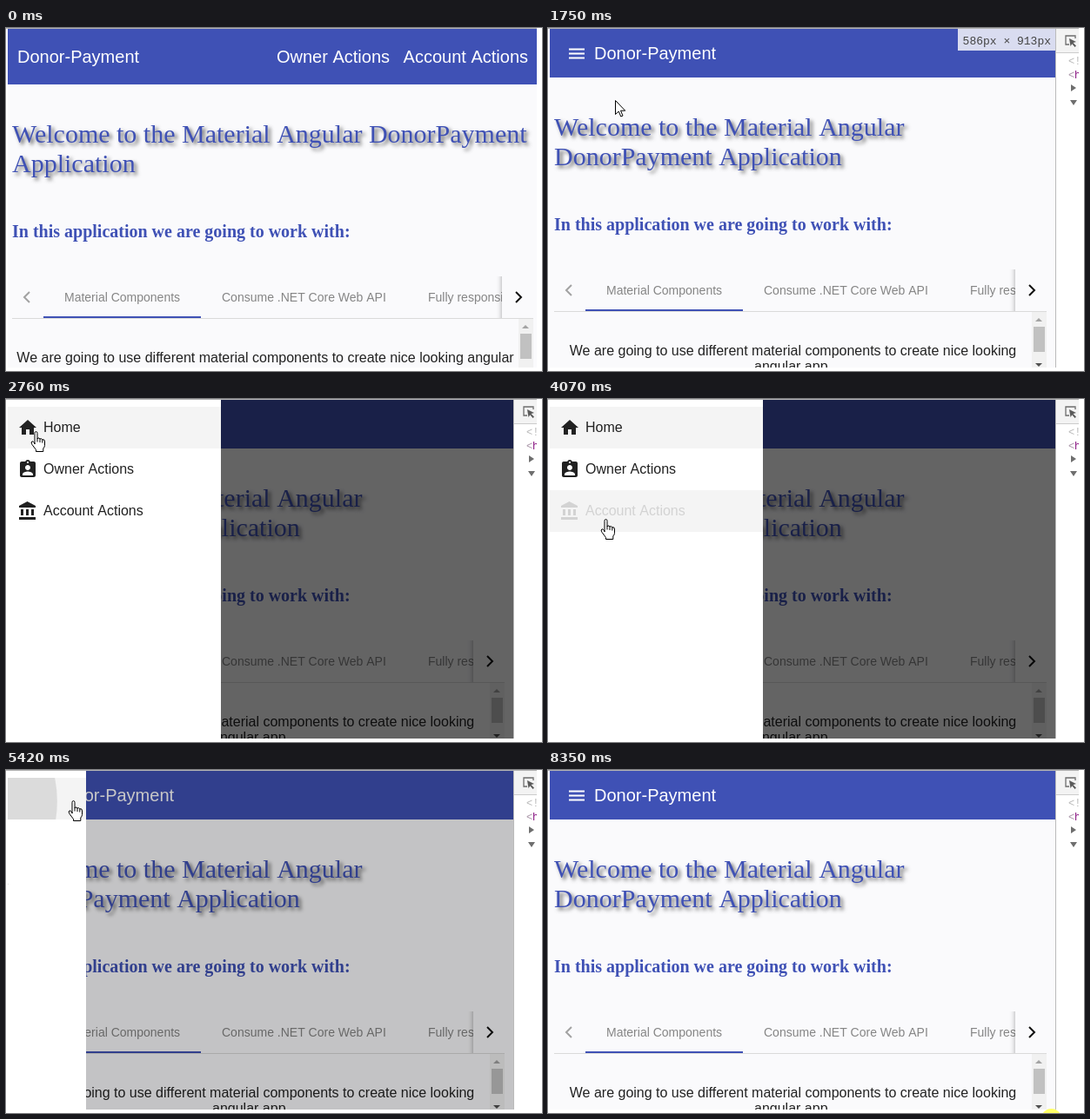
Recreate the animation shown at these times as an HTML page with a canvas. Size 616x395 px, loop 8480 ms.

```html
<!DOCTYPE html>
<html lang="en">
<head>
<meta charset="utf-8">
<title>Responsive navigation</title>
<style>
html, body { margin: 0; width: 100%; height: 100%; overflow: hidden; background: #fff; }
canvas { display: block; width: 616px; height: 395px; }
</style>
</head>
<body>
<canvas id="stage" width="616" height="395"></canvas>
<script>
const ctx = document.getElementById('stage').getContext('2d');
const LOOP = 8480;
const SANS = '"Liberation Sans", Arial, sans-serif';
const SERIF = '"Liberation Serif", "Times New Roman", serif';
const MONO = '"Liberation Mono", monospace';
const BLUE = '#3f51b5', PAPER = '#fafafc', HOVER = '#d3d3d3';
const DRAWER = 245;

const TICKS = [0,
  380, 460, 550, 650, 740, 840, 940, 1040, 1140,
  1390, 1480, 1570, 1660, 1750, 1870, 1960, 2040, 2120,
  2250, 2310, 2380, 2440, 2500, 2630, 2760, 3080,
  3260, 3340, 3420, 3490, 3570, 3770, 3850, 3920, 4000, 4070,
  4270, 4340, 4420, 4670, 4740, 4820, 4890, 4970, 5040,
  5290, 5350, 5420, 5530, 5620, 5710, 5840, 5960, 6090,
  6150, 6230, 6310, 6390, 6470, 7100, 7160, 7210, 8350];

// Pointer tip: time, x, y.
const POINTER = [
  [1390, 566, 338], [1660, 140, 118], [1750, 77, 83], [1870, 60, 66], [2120, 34, 37],
  [2760, 34, 37], [3080, 36, 39], [3190, 36, 39], [3570, 55, 80], [3700, 55, 80],
  [4070, 66, 138], [4200, 66, 138], [4420, 68, 85], [4600, 68, 85], [5040, 77, 35],
  [5530, 77, 35], [6090, 79, 36], [6150, 84, 60], [6390, 150, 290],
  [7100, 376, 381], [7160, 398, 380]];

const ICONS = {
  menu: 'M3 18h18v-2H3zm0-5h18v-2H3zm0-7v2h18V6z',
  home: 'M10 20v-6h4v6h5v-8h3L12 3 2 12h3v8z',
  badge: 'M19 3h-4.18C14.4 1.84 13.3 1 12 1c-1.3 0-2.4.84-2.82 2H5c-1.1 0-2 .9-2 2v14c0 1.1.9 2 2 2h14c1.1 0 2-.9 2-2V5c0-1.1-.9-2-2-2zm-7 0c.55 0 1 .45 1 1s-.45 1-1 1-1-.45-1-1 .45-1 1-1zm0 4c1.66 0 3 1.34 3 3s-1.34 3-3 3-3-1.34-3-3 1.34-3 3-3zm6 12H6v-1.4c0-2 4-3.1 6-3.1s6 1.1 6 3.1z',
  bank: 'M4 10v7h3v-7zm6 0v7h3v-7zM2 22h19v-3H2zm14-12v7h3v-7zm-4.5-9L2 6v2h19V6z',
  arrow: 'M.5 .5V16.5L4.2 13 6.8 19 9 18 6.5 12.2H11.7Z',
  hand: 'M5 15V2.5Q5 .5 6.5 .5T8 2.5V8.5Q10.5 7 11 9Q13.2 8 13.8 9.8Q16.5 9 16.5 12V16.5Q16.5 18 14.8 20V23.5H6.5V21.5L2 15.5Q.2 12.5 2 11.8Q3.3 11.5 5 14Z',
  fingers: 'M8 8V12.5M11 9V13M13.8 9.8V13.5'
};
for (const name in ICONS) ICONS[name] = new Path2D(ICONS[name]);

const ITEMS = [['home', 'Home'], ['badge', 'Owner Actions'], ['bank', 'Account Actions']];

const clamp = v => Math.max(0, Math.min(1, v));
const span = (t, from, to) => clamp((t - from) / (to - from));

function bezier(x1, y1, x2, y2) {
  const at = (s, a, b) => 3 * (1 - s) * (1 - s) * s * a + 3 * (1 - s) * s * s * b + s * s * s;
  return x => {
    if (x >= 1) return 1;
    let lo = 0, hi = 1;
    for (let i = 0; i < 24; i++) {
      const mid = (lo + hi) / 2;
      if (at(mid, x1, x2) < x) lo = mid; else hi = mid;
    }
    return at(lo, y1, y2);
  };
}
const slide = bezier(.25, .8, .25, 1);
const spread = bezier(0, 0, .2, 1);

function rect(x, y, w, h, color) {
  ctx.fillStyle = color;
  ctx.fillRect(x, y, w, h);
}
function disc(x, y, r, color) {
  ctx.fillStyle = color;
  ctx.beginPath();
  ctx.arc(x, y, r, 0, 7);
  ctx.fill();
}
function text(str, x, y, font, color, align = 'left') {
  ctx.font = font;
  ctx.fillStyle = color;
  ctx.textAlign = align;
  ctx.fillText(str, x, y);
}
function width(str, font) {
  ctx.font = font;
  return ctx.measureText(str).width;
}
function poly(points, color, lineWidth) {
  ctx.beginPath();
  points.forEach(([x, y]) => ctx.lineTo(x, y));
  if (lineWidth) {
    ctx.strokeStyle = color;
    ctx.lineWidth = lineWidth;
    ctx.stroke();
  } else {
    ctx.fillStyle = color;
    ctx.fill();
  }
}
function icon(name, x, y, color) {
  ctx.save();
  ctx.translate(x, y);
  ctx.fillStyle = color;
  ctx.fill(ICONS[name]);
  ctx.restore();
}
function clipped(x, y, w, h, draw) {
  ctx.save();
  ctx.beginPath();
  ctx.rect(x, y, w, h);
  ctx.clip();
  draw();
  ctx.restore();
}
function chevron(x, y, dir, color) {
  poly([[x - 3 * dir, y - 6], [x + 3 * dir, y], [x - 3 * dir, y + 6]], color, 2);
}

function pointerAt(t) {
  if (t < 1390 || (t >= 6470 && t < 7100) || t >= 7210) return null;
  let i = POINTER.findIndex(k => k[0] > t);
  if (i < 0) i = POINTER.length;
  const a = POINTER[i - 1], b = POINTER[i] || a;
  const p = a === b ? 0 : span(t, a[0], b[0]);
  return { x: a[1] + (b[1] - a[1]) * p, y: a[2] + (b[2] - a[2]) * p,
    hand: t >= 2040 && t < 6150 };
}

function toolbar(t, edge, small) {
  const font = '20px ' + SANS;
  rect(2, 1, edge - 2, small ? 56 : 64, BLUE);
  if (!small) {
    text('Donor-Payment', 13, 40, font, '#fff');
    text('Account Actions', edge - 16, 40, font, '#fff', 'right');
    text('Owner Actions', edge - 175, 40, font, '#fff', 'right');
    return;
  }
  if (t >= 2250 && t < 2760) {
    disc(33, 29, 20 * spread(span(t, 2200, 2440)), 'rgba(0,0,0,.14)');
  } else if (t >= 5700 && t < 8350) {
    disc(33, 29, 20, `rgba(0,0,0,${.15 * span(t, 5650, 5840)})`);
  }
  icon('menu', 21, 17.5, '#fff');
  text('Donor-Payment', 53, 36, font, t >= 5710 && t < 6230 ? HOVER : '#fff');
}

function heading(edge, dy) {
  const font = '30px ' + SERIF;
  let first = 'Welcome to the Material Angular', second = 'Application';
  const full = first + ' DonorPayment';
  if (7 + width(full, font) > edge - 12) second = 'DonorPayment ' + second;
  else first = full;
  ctx.save();
  ctx.shadowColor = 'rgba(60,60,60,.8)';
  ctx.shadowOffsetX = 3;
  ctx.shadowOffsetY = 3;
  ctx.shadowBlur = 4;
  text(first, 7, 132 + dy, font, BLUE);
  text(second, 7, 166 + dy, font, BLUE);
  ctx.restore();
  text('In this application we are going to work with:', 7, 241 + dy, 'bold 20px ' + SERIF, BLUE);
}

function tabs(edge, dy) {
  const font = '14px ' + SANS, right = edge - 10, y = 310 + dy;
  rect(7, y + 24, right - 7, 1, '#dadada');
  rect(43, y + 22, 181, 2, BLUE);
  clipped(43, y - 25, right - 79, 48, () => {
    text('Material Components', 67, y + 5, font, '#858585');
    text('Consume .NET Core Web API', 248, y + 5, font, '#858585');
    text('Fully responsive', 485, y + 5, font, '#858585');
  });
  chevron(24, y, -1, '#a2a2a2');
  // Only the left side of the button's shadow shows.
  clipped(right - 46, y - 24, 46, 48, () => {
    ctx.save();
    ctx.shadowColor = 'rgba(0,0,0,.35)';
    ctx.shadowBlur = 6;
    rect(right - 36, y - 34, 56, 68, PAPER);
    ctx.restore();
  });
  chevron(right - 17, y, 1, '#111');
}

function panel(edge, dy) {
  const font = '16px ' + SANS, mid = (edge - 20) / 2, top = 335 + dy, bar = edge - 27;
  const start = 'We are going to use different material components to create nice looking';
  const wide = start + ' angular';
  const wraps = width(wide, font) > edge - 40;
  text(wraps ? start : wide, mid, 385 + dy, font, '#222', 'center');
  text(wraps ? 'angular app.' : 'app.', mid, 403 + dy, font, '#222', 'center');
  rect(bar, top, 17, 80, '#f1f1f1');
  rect(bar + 2, top + 17, 13, 29, '#c1c1c1');
  const x = bar + 8;
  poly([[x - 4, top + 11], [x, top + 7], [x + 4, top + 11]], '#a3a3a3');
  poly([[x - 4, top + 59], [x, top + 63], [x + 4, top + 59]], '#505050');
}

function page(t, edge) {
  const small = edge < 597, dy = small ? -8 : 0;
  rect(2, 1, edge - 2, 390, PAPER);
  toolbar(t, edge, small);
  heading(edge, dy);
  tabs(edge, dy);
  panel(edge, dy);
  if (edge < 616 && t < 1870) {
    rect(edge - 112, 1, 112, 25, 'rgba(255,255,255,.8)');
    text(Math.round(edge + 3) + 'px × 913px', edge - 5, 19, '13px ' + MONO, '#444', 'right');
  }
}

function drawer(t, edge, pointer) {
  const open = t < 4000 ? slide(span(t, 2357, 2757)) : 1 - slide(span(t, 5335, 5735));
  if (open <= 0) return;
  rect(2, 1, edge - 2, 390, `rgba(0,0,0,${.6 * open})`);
  const dx = Math.round(DRAWER * (open - 1));
  const row = pointer && t >= 3080 ? Math.floor((pointer.y - 9) / 48) : -1;
  ctx.save();
  ctx.translate(dx, 0);
  rect(2, 1, DRAWER, 390, '#fff');
  ITEMS.forEach(([name, label], i) => {
    const y = 9 + 48 * i, color = i === row ? HOVER : '#212121';
    if (i === row || (i === 0 && t >= 2760)) rect(2, y, DRAWER, 48, '#f4f4f4');
    if (i === 0 && t >= 5290) {
      clipped(2, y, DRAWER, 48, () =>
        disc(77, 36, 171 * spread(span(t, 5285, 5585)), 'rgba(0,0,0,.1)'));
    }
    icon(name, 13, y + 12, color);
    text(label, 43, y + 29, '16px ' + SANS, color);
  });
  ctx.restore();
}

function inspector(edge) {
  const x = Math.round(edge), font = '12px ' + MONO;
  rect(x, 1, 40, 390, '#fff');
  rect(x, 1, 40, 27, '#f3f3f3');
  rect(x, 28, 40, 1, '#ccc');
  rect(x, 1, 1, 390, '#bbb');
  poly([[x + 16, 19], [x + 12, 19], [x + 12, 9], [x + 23, 9], [x + 23, 12]], '#6e6e6e', 1.3);
  poly([[x + 16, 12], [x + 24, 16], [x + 20.5, 17], [x + 24, 20.5], [x + 22.5, 22],
    [x + 19.3, 18.3], [x + 17.5, 21]], '#5a5a5a');
  text('<!', x + 15, 42, font, '#b8b8b8');
  text('<', x + 15, 58, font, '#a894a6');
  text('h', x + 22, 58, font, '#881280');
  poly([[x + 18, 65], [x + 24, 69], [x + 18, 73]], '#6e6e6e');
  poly([[x + 17, 83], [x + 25, 83], [x + 21, 89]], '#6e6e6e');
}

function drawPointer({ x, y, hand }) {
  const shape = ICONS[hand ? 'hand' : 'arrow'];
  ctx.save();
  ctx.translate(Math.round(x) - (hand ? 6 : 0), Math.round(y));
  ctx.fillStyle = '#fff';
  ctx.fill(shape);
  ctx.strokeStyle = '#000';
  ctx.lineWidth = 1;
  ctx.stroke(shape);
  if (hand) ctx.stroke(ICONS.fingers);
  ctx.restore();
}

function draw(t) {
  const edge = 616 - 33 * span(t, 300, 1140);
  const pointer = pointerAt(t);
  rect(0, 0, 616, 395, '#fff');
  rect(0, 0, 610, 1, '#b4b4b4');
  clipped(2, 1, 608, 390, () => {
    clipped(2, 1, edge - 2, 390, () => {
      page(t, edge);
      drawer(t, edge, pointer);
    });
    if (edge < 610) inspector(edge);
    if (pointer) drawPointer(pointer);
  });
  if (t >= 8350) disc(578.5, 401.5, 11.5, '#ffff66');
}

function frame() {
  const t = performance.now() % LOOP;
  draw(TICKS.findLast(tick => tick <= t));
  requestAnimationFrame(frame);
}
frame();
</script>
</body>
</html>
```
